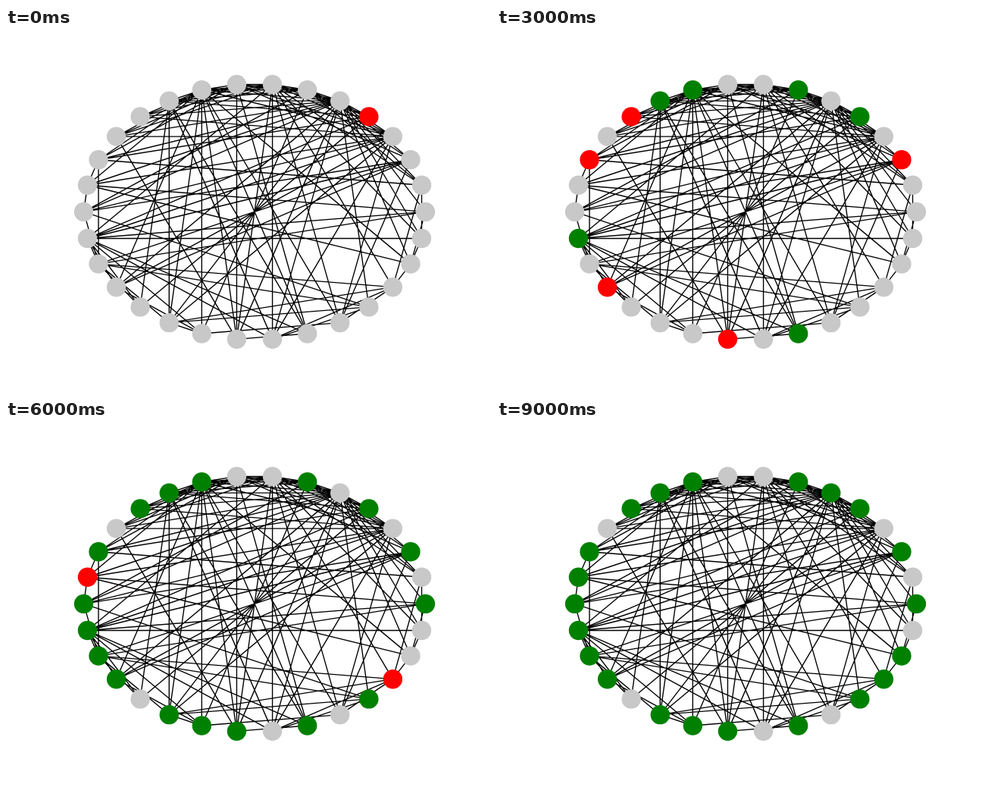
Write an HTML page with a canvas that moves like this. It is 640 px wide and 480 px high and loops after 10000 ms.

```html
<!DOCTYPE html>
<html lang="en">
<head>
<meta charset="utf-8">
<title>Spread on a network</title>
<style>
  html, body { margin: 0; width: 100%; height: 100%; overflow: hidden; background: #fff; }
  canvas { display: block; }
</style>
</head>
<body>
<canvas id="stage" width="640" height="480"></canvas>
<script>
const ctx = document.getElementById('stage').getContext('2d');
const NODE_COUNT = 30, FIRST_LINKED = 5, STEP_MS = 1000, LOOP_MS = 10000;

// Each node from FIRST_LINKED on lists the earlier nodes it links to.
const links = [
  [0, 1, 2, 3, 4],
  [1, 2, 3, 4, 5],
  [1, 3, 4, 5, 6],
  [2, 3, 5, 6, 7],
  [3, 5, 6, 7, 8],
  [4, 5, 6, 7, 9],
  [3, 5, 7, 8, 9],
  [3, 5, 7, 8, 9],
  [1, 4, 5, 8, 9],
  [0, 3, 5, 9, 13],
  [2, 3, 5, 6, 14],
  [0, 2, 3, 4, 7],
  [0, 2, 13, 15, 16],
  [2, 3, 5, 9, 16],
  [4, 10, 16, 17],
  [3, 5, 10, 17, 9],
  [6, 9, 16, 18, 20],
  [5, 7, 8, 9, 12],
  [3, 5, 7, 10, 16],
  [8, 9, 10, 16, 22],
  [2, 3, 7, 9, 21],
  [5, 15, 17, 20, 23],
  [1, 7, 17, 20, 23, 25],
  [0, 5, 9, 14, 27],
  [5, 7, 16, 28, 1]
];

// Nodes that turn red at each step; they are green afterwards.
const waves = [
  [4], [10, 16], [6, 9, 24], [2, 11, 13, 18, 22], [15, 17, 20, 21],
  [0, 26], [14, 27], [28], [5], []
];

const nodes = Array.from({ length: NODE_COUNT }, (_, i) => {
  const angle = i * 2 * Math.PI / NODE_COUNT;
  return {
    x: 328 + 225.45 * Math.cos(angle),
    y: 242.4 - 168.9 * Math.sin(angle),
    wave: waves.findIndex(wave => wave.includes(i))
  };
});

const edges = new Path2D();
links.forEach((targets, i) => {
  const from = nodes[i + FIRST_LINKED];
  for (const target of targets) {
    edges.moveTo(from.x, from.y);
    edges.lineTo(nodes[target].x, nodes[target].y);
  }
});

function nodeColor(wave, step) {
  if (wave < 0 || wave > step) return '#c8c8c8';
  return wave === step ? '#ff0000' : '#008000';
}

function draw(step) {
  ctx.fillStyle = '#fff';
  ctx.fillRect(0, 0, 640, 480);
  ctx.lineWidth = 1.39;
  ctx.strokeStyle = '#000';
  ctx.stroke(edges);
  for (const { x, y, wave } of nodes) {
    ctx.fillStyle = nodeColor(wave, step);
    ctx.beginPath();
    ctx.arc(x, y, 12.7, 0, 2 * Math.PI);
    ctx.fill();
  }
}

const start = performance.now();
function tick() {
  const time = (performance.now() - start) % LOOP_MS;
  draw(Math.floor(time / STEP_MS));
  requestAnimationFrame(tick);
}
tick();
</script>
</body>
</html>
```
